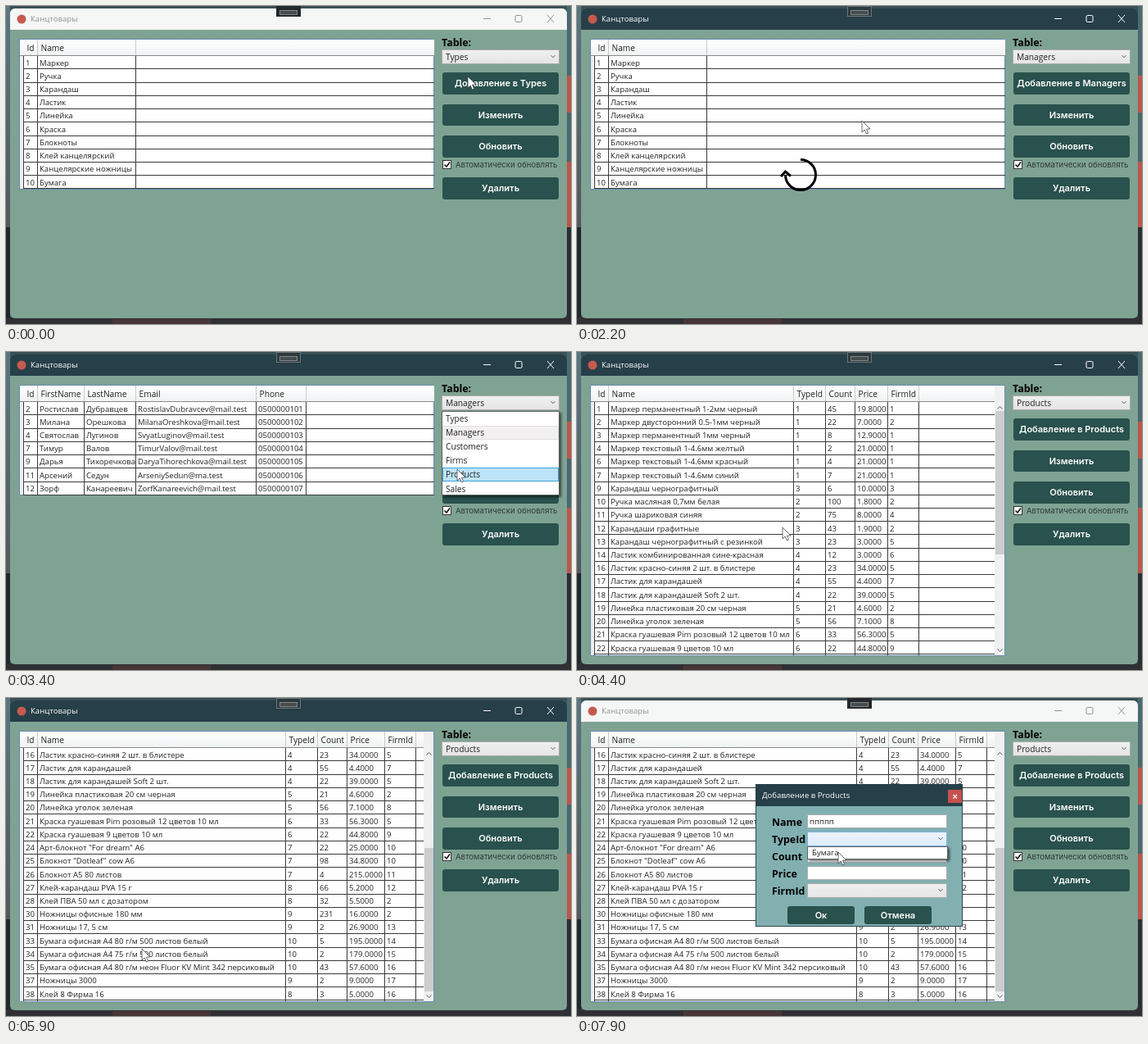
These frames come from a looping animation (690 by 388 pixels, 8 s). An HTML page with a canvas:

```html
<!DOCTYPE html>
<html lang="ru">
<head>
<meta charset="utf-8">
<style>
html, body { margin: 0; width: 100%; height: 100%; overflow: hidden; background: #263238; }
canvas { display: block; }
</style>
</head>
<body>
<canvas id="stage" width="690" height="388"></canvas>
<script>
const ctx = document.getElementById('stage').getContext('2d');
const LOOP = 8000, STEP = 100;
const TOP = 60.7, ROW = 16.22;
const UI = '"Open Sans", "Noto Sans", sans-serif';
const GEO = 'Inter, sans-serif';
const LATIN = { size: 10.2 };
const TABLES = ['Types', 'Managers', 'Customers', 'Firms', 'Products', 'Sales'];

const types = `Маркер,Ручка,Карандаш,Ластик,Линейка,Краска,Блокноты,Клей канцелярский,Канцелярские ножницы,Бумага`
  .split(',').map((name, i) => [i + 1, name]);

const managers = `2|Ростислав|Дубравцев|RostislavDubravcev@mail.test|0500000101
3|Милана|Орешкова|MilanaOreshkova@mail.test|0500000102
4|Святослав|Лугинов|SvyatLuginov@mail.test|0500000103
7|Тимур|Валов|TimurValov@mail.test|0500000104
9|Дарья|Тихоречкова|DaryaTihorechkova@mail.test|0500000105
11|Арсений|Седун|ArseniySedun@ma.test|0500000106
12|Зорф|Канареевич|ZorfKanareevich@mail.test|0500000107`.split('\n').map(row => row.split('|'));

const missingIds = [5, 8, 15, 23, 29, 32, 36];
const productIds = Array.from({ length: 38 }, (_, i) => i + 1).filter(id => !missingIds.includes(id));
const products = `Маркер перманентный 1-2мм черный|1|45|19.8|1
Маркер двусторонний 0.5-1мм черный|1|22|7|2
Маркер перманентный 1мм черный|1|8|12.9|1
Маркер текстовый 1-4.6мм желтый|1|2|21|1
Маркер текстовый 1-4.6мм красный|1|4|21|1
Маркер текстовый 1-4.6мм синий|1|7|21|1
Карандаш чернографитный|3|6|10|3
Ручка масляная 0,7мм белая|2|100|1.8|2
Ручка шариковая синяя|2|75|8|4
Карандаши графитные|3|43|1.9|2
Карандаш чернографитный с резинкой|3|23|3|5
Ластик комбинированная сине-красная|4|12|3|6
Ластик красно-синяя 2 шт. в блистере|4|23|34|5
Ластик для карандашей|4|55|4.4|7
Ластик для карандашей Soft 2 шт.|4|22|39|5
Линейка пластиковая 20 см черная|5|21|4.6|2
Линейка уголок зеленая|5|56|7.1|8
Краска гуашевая Pim розовый 12 цветов 10 мл|6|33|56.3|5
Краска гуашевая 9 цветов 10 мл|6|22|44.8|9
Арт-блокнот "For dream" А6|7|22|25|10
Блокнот "Dotleaf" cow А6|7|98|34.8|10
Блокнот А5 80 листов|7|4|215|11
Клей-карандаш PVA 15 г|8|66|5.2|12
Клей ПВА 50 мл с дозатором|8|32|5.5|2
Ножницы офисные 180 мм|9|231|16|2
Ножницы 17, 5 см|9|2|26.9|13
Бумага офисная А4 80 г/м 500 листов белый|10|5|195|14
Бумага офисная А4 75 г/м 500 листов белый|10|2|179|15
Бумага офисная А4 80 г/м неон Fluor KV Mint 342 персиковый|10|43|57.6|16
Ножницы 3000|9|2|9|17
Клей 8 Фирма 16|8|3|5|16`.split('\n').map((row, i) => {
  const [name, type, count, price, firm] = row.split('|');
  return [productIds[i], name, type, count, (+price).toFixed(4), firm];
});

const pointer = [
  [0, 564, 86], [300, 560, 63], [500, 557, 64], [900, 549, 97], [1100, 549, 99], [1300, 549, 99],
  [1800, 348, 140], [2200, 348, 140], [2500, 400, 125], [2900, 566, 63], [3100, 560, 66],
  [3400, 551, 143], [3500, 551, 146], [3800, 235, 210], [4200, 251, 214], [5100, 251, 214],
  [5600, 90, 300], [5700, 78, 304], [5900, 166, 306], [6400, 572, 95], [6600, 572, 95],
  [7000, 345, 153], [7400, 335, 154], [7500, 330, 160], [7600, 330, 160], [7700, 328, 172], [7900, 319, 188]
];

function pointerAt(t) {
  const next = Math.max(1, pointer.findIndex(p => p[0] >= t));
  const [t0, x0, y0] = pointer[next - 1], [t1, x1, y1] = pointer[next];
  const k = (t - t0) / (t1 - t0), e = k * k * (3 - 2 * k);
  return [x0 + (x1 - x0) * e, y0 + (y1 - y0) * e];
}

function rect(x, y, w, h, fill, border) {
  ctx.fillStyle = fill;
  ctx.fillRect(x, y, w, h);
  if (!border) return;
  ctx.strokeStyle = border;
  ctx.lineWidth = 1;
  ctx.strokeRect(x + .5, y + .5, w - 1, h - 1);
}

function rounded(x, y, w, h, r, fill) {
  ctx.fillStyle = fill;
  ctx.beginPath();
  ctx.roundRect(x, y, w, h, r);
  ctx.fill();
}

function line(points, color, width = 1) {
  ctx.strokeStyle = color;
  ctx.lineWidth = width;
  ctx.beginPath();
  points.forEach(([x, y]) => ctx.lineTo(x, y));
  ctx.stroke();
}

function text(str, x, y, { size = 9.6, color = '#222', family = UI, weight = 400, align = 'left' } = {}) {
  ctx.font = `${weight} ${size}px ${family}`;
  ctx.fillStyle = color;
  ctx.textAlign = align;
  ctx.textBaseline = 'alphabetic';
  ctx.fillText(str, x, y + size * .36);
}

function gradient(y0, y1, from, to) {
  const g = ctx.createLinearGradient(0, y0, 0, y1);
  g.addColorStop(0, from);
  g.addColorStop(1, to);
  return g;
}

function shadowed(draw) {
  ctx.save();
  ctx.shadowColor = 'rgba(0,0,0,.6)';
  ctx.shadowBlur = 3;
  ctx.shadowOffsetX = ctx.shadowOffsetY = 2;
  draw();
  ctx.restore();
}

function button(label, x, y, w, h) {
  rounded(x, y, w, h, 3, '#29514d');
  text(label, x + w / 2, y + h / 2, { size: 11, color: '#fff', family: GEO, weight: 600, align: 'center' });
}

function chevron(x, y, s = 2.5, up = false) {
  const d = up ? -s / 2 : s / 2;
  line([[x - s, y - d], [x, y + d], [x + s, y - d]], '#555');
}

function combo(label, x, y, w, h, hot) {
  const fill = hot ? gradient(y, y + h, '#ecf4fc', '#dcecfc') : gradient(y, y + h, '#f0f0f0', '#e5e5e5');
  rect(x, y, w, h, fill, hot ? '#7eb4ea' : '#acacac');
  text(label, x + 5, y + h / 2 + .5, LATIN);
  chevron(x + w - 8, y + h / 2 - .5);
}

function wallpaper() {
  rect(0, 0, 690, 388, '#3a4f56');
  rect(0, 0, 5, 270, gradient(0, 270, '#587781', '#54585c'));
  rect(0, 270, 5, 118, '#23282d');
  rect(685, 0, 5, 85, '#496a71');
  rect(685, 85, 5, 185, '#b9584f');
  rect(685, 130, 5, 60, '#48696f');
  rect(685, 270, 5, 118, '#292f34');
  rect(0, 380, 690, 8, '#2f3034');
  rect(130, 382, 120, 6, '#483636');
}

function mainWindow(active) {
  rounded(5, 3, 680, 378, 6, '#7fa393');
  rounded(5, 3, 680, 26, [6, 6, 0, 0], active ? '#263f49' : '#f5f6f6');
  const ink = active ? '#fff' : '#929292';
  ctx.fillStyle = '#c65a4e';
  ctx.beginPath();
  ctx.arc(19, 16, 5.5, 0, 7);
  ctx.fill();
  text('Канцтовары', 30, 16, { color: ink });
  line([[583, 15.5], [592, 15.5]], ink);
  ctx.strokeStyle = ink;
  ctx.beginPath();
  ctx.roundRect(622, 11.5, 8, 8, 1.5);
  ctx.stroke();
  line([[661, 11], [669, 20]], ink);
  line([[669, 11], [661, 20]], ink);
  rect(330, 0, 30, 13, active ? '#2c3a40' : '#23282b', active ? '#6d7577' : '#23282b');
  rect(334, 5, 22, 6, '#454c4d', '#82888a');
}

function grid(headers, edges, rows, right = 523, bottom = Math.round(TOP + rows.length * ROW) + 1) {
  rect(16, 40, 507, bottom - 40, '#fff', '#688caf');
  rect(17, 41, 4, bottom - 42, '#eef0f0');
  rect(17, 41, right - 17, 20, gradient(41, 61, '#fff', '#eff1f2'));
  headers.forEach((label, i) => {
    text(label, edges[i] + 4.5, 51, LATIN);
    line([[edges[i + 1] + .5, 41], [edges[i + 1] + .5, 61]], '#c9caca');
  });
  line([[17, 60.5], [right, 60.5]], '#888');
  rows.forEach((row, r) => {
    const y = TOP + r * ROW, end = Math.floor(y + ROW) + .5;
    row.forEach((cell, c) => text(cell, edges[c] + 3, y + 8.4));
    line([[21, end], [right, end]], '#3a3a3a');
  });
  edges.forEach(x => line([[x + .5, 61], [x + .5, bottom - 1]], '#3a3a3a'));
}

function productGrid(offset) {
  const widths = [17, offset >= 10 ? 303 : 226, 38.5, 36, offset >= 3 ? 46 : 40, 38];
  const edges = [21];
  widths.forEach(w => edges.push(Math.round(edges[edges.length - 1] + w)));
  grid(['Id', 'Name', 'TypeId', 'Count', 'Price', 'FirmId'], edges, products.slice(offset, offset + 19), 510, 371);
  rect(510, 41, 12, 329, '#f0f0f0');
  rect(511, 72 + offset * 287 / 31, 11, 175, '#cdcdcd');
  chevron(516.5, 68, 3, true);
  chevron(516.5, 364, 3);
}

function sidebar(current) {
  text('Table:', 532, 45, { size: 12.4, weight: 700, color: '#000' });
  combo(current, 532, 53, 144, 18);
  button('Добавление в ' + current, 533, 81, 142, 27);
  button('Изменить', 533, 120, 142, 26);
  button('Обновить', 533, 158, 142, 27);
  button('Удалить', 533, 209, 142, 27);
  rect(533, 188, 11, 11, '#fff', '#333');
  line([[535.5, 193.5], [538, 196], [542, 190.5]], '#111', 1.5);
  text('Автоматически обновлять', 549, 193.5, { family: GEO, color: '#2c3a35' });
}

function tableList(current, y) {
  shadowed(() => rect(532, 72, 144, 103, '#fff'));
  rect(532, 72, 144, 103, '#fff', '#646464');
  const hovered = Math.floor((y - 73) / 17.1);
  TABLES.forEach((name, i) => {
    const top = Math.round(73 + i * 17.1);
    if (i === hovered) rect(533, top, 142, 17, '#bce3f7', '#3aa5dc');
    else if (name === current) rect(533, top, 142, 17, '#f2f0f0', '#e0dfdf');
    text(name, 537, top + 8.5, LATIN);
  });
}

function spinner() {
  ctx.strokeStyle = '#000';
  ctx.lineWidth = 3;
  ctx.beginPath();
  ctx.arc(273, 206, 18.5, -Math.PI / 2, Math.PI);
  ctx.stroke();
  line([[249, 208], [254.5, 202], [261, 207.5]], '#000', 3);
}

function dialog(typed, listOpen) {
  rect(218, 105, 253, 174, '#82b0b1', '#2c474e');
  rect(218, 105, 253, 27, '#263f49');
  text('Добавление в Products', 226, 119, { color: '#fff' });
  rect(453, 112, 17, 16, '#c75050');
  line([[459.5, 118], [464, 122.5]], '#fff', 1.3);
  line([[464, 118], [459.5, 122.5]], '#fff', 1.3);
  ['Name', 'TypeId', 'Count', 'Price', 'FirmId'].forEach((label, i) => {
    const y = 142 + i * 21;
    text(label, 238, y + 9.5, { size: 12.4, weight: 700, color: '#000' });
    if (i === 1 || i === 4) combo('', 281, y, 171, 18, i === 1 && listOpen);
    else rect(281, y, 171, 17, '#fff', '#abadb3');
  });
  text('п'.repeat(typed), 284, 151);
  button('Ок', 257, 254, 82, 22);
  button('Отмена', 351, 254, 82, 22);
  if (!listOpen) return;
  shadowed(() => rect(281, 181, 172, 16, '#fff'));
  rect(281, 181, 172, 16, '#fff', '#646464');
  text('Бумага', 287, 188.5);
}

function cursor(x, y) {
  ctx.save();
  ctx.translate(x, y);
  ctx.beginPath();
  [[0, 0], [0, 14], [3.2, 11], [5.4, 16], [7.6, 15], [5.5, 10.2], [10, 10]].forEach(p => ctx.lineTo(...p));
  ctx.closePath();
  ctx.fillStyle = '#fff';
  ctx.fill();
  ctx.strokeStyle = '#444';
  ctx.lineWidth = .8;
  ctx.stroke();
  ctx.restore();
}

function draw(t) {
  const within = (a, b) => t >= a && t < b;
  const current = t < 1400 ? 'Types' : t < 3600 ? 'Managers' : 'Products';
  const [x, y] = pointerAt(t);
  wallpaper();
  mainWindow(within(400, 6600));
  if (t < 2400) grid(['Id', 'Name'], [21, 38, 158], types);
  else if (t < 4100) grid(['Id', 'FirstName', 'LastName', 'Email', 'Phone'], [21, 38, 95, 158, 305, 366], managers);
  else productGrid(Math.min(12, Math.max(0, Math.floor((t - 5100) / STEP) * 3)));
  sidebar(current);
  if (within(1500, 2400) || within(3700, 4100)) spinner();
  if (within(500, 1400) || within(3000, 3600)) tableList(current, y);
  if (t >= 6600) dialog(t < 7300 ? 0 : t < 7500 ? 1 : 5, t >= 7700);
  cursor(x, y);
}

function tick() {
  const t = performance.now() % LOOP;
  draw(Math.min(7900, Math.floor(t / STEP) * STEP));
  requestAnimationFrame(tick);
}
tick();
</script>
</body>
</html>
```
